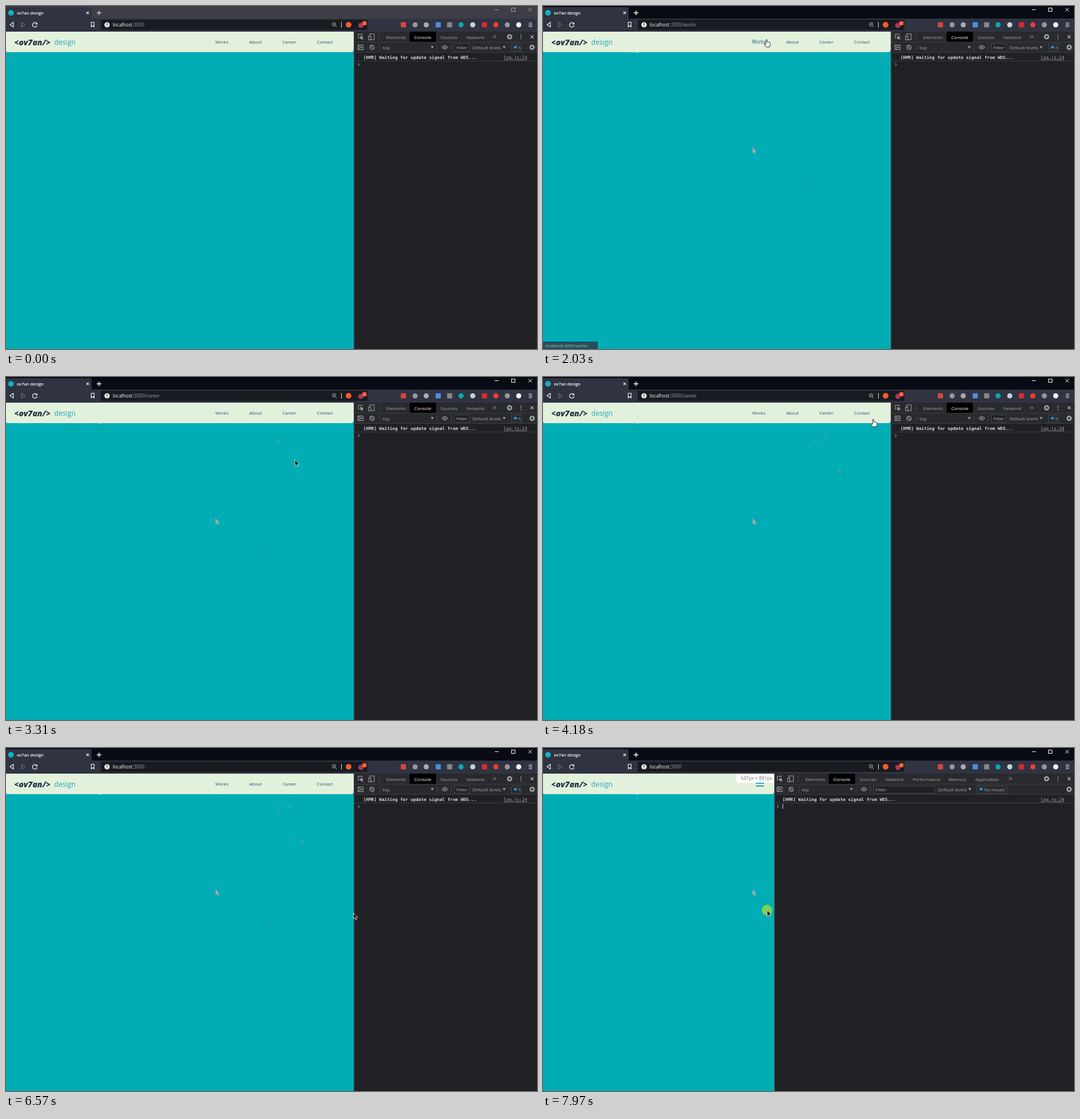
An HTML page for the animation above (8000 ms loop, 930 by 602 pixels).

```html
<!DOCTYPE html>
<html lang="en">
<head>
<meta charset="utf-8">
<title>Browser window</title>
<style>
  html, body { margin: 0; width: 100%; height: 100%; overflow: hidden; background: #202124; }
  svg { display: block; width: 930px; height: 602px; }
  text { font: 8px "Open Sans", "Noto Sans", sans-serif; white-space: pre; }
  .mono { font: bold 7.65px "DejaVu Sans Mono", monospace; }
</style>
</head>
<body>
<svg id="stage" viewBox="0 0 930 602" xmlns="http://www.w3.org/2000/svg"></svg>
<script>
const LOOP = 8000;
const WIDE = 609;
const TEAL = '#00adb5';

const rect = (x, y, w, h, fill, more = '') =>
  `<rect x="${x}" y="${y}" width="${w}" height="${h}" fill="${fill}" ${more}/>`;
const dot = (x, y, r, fill, more = '') =>
  `<circle cx="${x}" cy="${y}" r="${r}" fill="${fill}" ${more}/>`;
const line = (d, stroke, width = 1, more = '') =>
  `<path d="${d}" fill="none" stroke="${stroke}" stroke-width="${width}" ${more}/>`;
const shape = (d, fill, more = '') => `<path d="${d}" fill="${fill}" ${more}/>`;
const text = (x, y, label, fill, more = '') =>
  `<text x="${x}" y="${y}" fill="${fill}" ${more}>${label}</text>`;
const cross = (x, y, r, stroke, w = 1) =>
  line(`M${x - r} ${y - r}l${2 * r} ${2 * r}m0 ${-2 * r}l${-2 * r} ${2 * r}`, stroke, w);

const ARROW = 'M0 0V10.5L2.4 8.3 4 12 5.7 11.3 4.1 7.8H7.4Z';
const HAND = 'M-1 .8Q0-.4 1 .8V5L2 4.4 3.2 5.2 4.4 4.8 5.4 5.7Q6.6 5.6 6.6 6.8V9.5L5.4 13.5H-.8L-4 8.5Q-4 7.2-2.8 7.4L-1 9Z';

function gear(x, y) {
  return dot(x, y, 2.9, 'none', 'stroke="#a4a7ab" stroke-width="2"') +
    dot(x, y, 4.3, 'none', 'stroke="#a4a7ab" stroke-width="1.3" stroke-dasharray="1.7 1.68"');
}

function titleBar(focused) {
  const ink = focused ? '#fff' : '#a5a6ac';
  return rect(0, 0, 930, 23, focused ? '#090b14' : '#3d3e46') +
    shape('M0 23V2H147Q150 2 150 5V23Z', '#303341') +
    dot(8.7, 12, 5, '#12afc0') +
    text(19, 14.8, 'ov7an design', '#fff', 'style="font-size:7.4px;font-weight:600"') +
    cross(143, 12, 2.2, '#fff', 1.1) +
    line('M159 12h8M163 8v8', focused ? '#fff' : '#d0d0d4', 1.3) +
    line('M856 6.5h7', ink) +
    rect(885.5, 3.5, 6, 6, 'none', `stroke="${ink}"`) +
    cross(918, 6.5, 3, ink);
}

function toolbar() {
  const chips = [
    [696, '#d8483c'], [757, '#4d8ee0'], [777, '#85878e'], [838, '#d92b31']
  ].map(([x, c]) => rect(x - 4.5, 28.5, 9, 9, c, 'rx="1"')).join('');
  const rounds = [
    [716.5, '#92999c'], [736, '#aaaaae'], [797, '#0aa9ad'], [817.5, '#c5d3d6'], [858, '#f23c35'], [878, '#96979e'], [898, '#f2f2f4']
  ].map(([x, c]) => dot(x, 33, 4.5, c)).join('');
  return rect(0, 22, 930, 23, '#303341') +
    rect(166, 24, 467, 18, '#191b21', 'rx="2"') +
    line('M12.8 28.5V37L7 32.8Z', '#fff', 1.1) +
    line('M27.5 28.5V37L33.3 32.8Z', '#7c7e87') +
    line('M53.6 30.6A4 4 0 1 0 54.4 34', '#fff', 1.2) + shape('M54.8 28.5V32.2H51Z', '#fff') +
    line('M149.3 28.5h5v8l-2.5-2-2.5 2Z', '#fff', 1.1) +
    dot(177, 33, 4.6, '#fff') + line('M177 30v3.7m0 1v1.3', '#191b21', 1.3) +
    dot(574.5, 32.2, 3, 'none', 'stroke="#b6b8be"') + line('M573 32.2h3M576.8 34.6l2.4 2.4', '#b6b8be') +
    line('M587.5 28v10', '#ddd') +
    dot(600, 33, 5, '#f45a2d') +
    dot(621.5, 34, 4.6, '#a33a62') +
    rect(624, 26.5, 7.5, 7.5, '#fb542b', 'rx="2"') +
    text(627.8, 32.6, '1', '#fff', 'text-anchor="middle" style="font-size:6px"') +
    chips + rounds +
    line('M915.5 30h6M915.5 33h6M915.5 36h6', '#fff', 1.2);
}

const TABS = [
  ['Elements', 57], ['Console', 106], ['Sources', 152], ['Network', 197],
  ['Performance', 245], ['Memory', 307.5], ['Application', 354.5], ['', 414.5]
];

function devtools(left, loaded, caret) {
  const grey = '#a4a7ab', rule = '#45474a';
  const at = dx => left + dx;
  const down = (x, y) => shape(`M${x - 2.5} ${y - 2}h5l-2.5 4Z`, grey);
  let out = rect(left, 45, 930, 557, '#202124') + rect(left, 45, 930, 37, '#292a2d') +
    rect(at(98), 45, 46, 18.5, '#000') +
    line(`M${left} 63.5H930M${left} 81.5H930M${left} 96.5H930`, '#3b3d40') +
    line(`M${at(44.5)} 49v11M${at(45.5)} 68v10M${at(146)} 68v10M${at(171)} 68v10`, rule);

  out += line(`M${at(15)} 52v-2.5h-7v7h2.5`, grey) + shape(`M${at(11)} 52.5l6.5 2.6-2.7 1 2 2.2-1 1-2-2.3-1.2 2.4Z`, grey) +
    rect(at(28), 49, 8, 10, 'none', `stroke="${grey}"`) + rect(at(26), 53, 4, 6.5, '#292a2d', `stroke="${grey}"`);

  let next = 0;
  for (let i = 0; i < 7 && left + TABS[i + 1][1] < 865; i++) {
    const [label, dx] = TABS[i];
    out += text(at(dx), 57.5, label, label === 'Console' ? '#fff' : grey);
    next = TABS[i + 1][1];
  }
  const more = at(next - 1);
  out += line(`M${more} 51.5l2.4 2.4-2.4 2.4m3.2-4.8l2.4 2.4-2.4 2.4`, grey) +
    gear(882, 54) + [50.5, 54, 57.5].map(y => dot(902, y, 0.9, grey)).join('') + cross(921.5, 54, 2.7, '#c5c7ca', 1.1);

  const end = Math.min(at(283.5), Math.max(at(202), 774));
  const issuesEnd = Math.min(end + 127, 903);
  out += rect(at(7.5), 68.5, 9, 8, 'none', `stroke="${grey}"`) + line(`M${at(10)} 68.5v8`, grey) + shape(`M${at(12)} 70.2v4.6l3-2.3Z`, grey) +
    dot(at(32), 72.7, 3.8, 'none', `stroke="${grey}" stroke-width="1.2"`) + line(`M${at(29.3)} 70l5.4 5.4`, grey, 1.2) +
    text(at(50.5), 75.8, 'top', grey) + down(at(137.5), 72.5) +
    line(`M${at(154.5)} 72.5q5-6.4 10 0q-5 6.4-10 0Z`, grey, 1.1) + dot(at(159.5), 72.5, 1.5, grey) +
    rect(at(176.5), 66.5, end - at(176.5), 13, '#202124', `stroke="${rule}"`) +
    text(at(180), 76, 'Filter', '#b5b8bc') +
    text(end + 6, 75.8, 'Default levels', grey) + down(end + 61.5, 72.5) +
    `<svg x="${end + 74}" y="66" width="${issuesEnd - end - 74}" height="14">` +
    rect(4.5, 4, 5.5, 4.5, '#2188df') + text(12.5, 9.8, 'No Issues', grey) + '</svg>' +
    rect(end + 74.5, 66.5, issuesEnd - end - 75, 13, 'none', `stroke="${rule}"`) +
    rect(906, 64, 24, 17, '#292a2d') + gear(921.5, 72.5);

  if (loaded) {
    out += text(at(17), 93, '[HMR] Waiting for update signal from WDS...', '#d6d8da', 'class="mono"') +
      text(913, 93, 'log.js:24', '#a4a7ab', 'class="mono" style="font-weight:400" text-anchor="end" text-decoration="underline"');
  }
  out += line(`M${at(7.5)} 100.2l2.5 2.5-2.5 2.5`, '#3f8ee8', 1.2);
  if (caret) out += line(`M${at(17.5)} 98v9`, '#d8d8d8');
  return out;
}

const NAV = [['Works', 378], ['About', 437], ['Career', 496.3], ['Contact', 558.5]];

// Faint pointer marks that stay behind: x, y, colour, opacity, start
const MARKS = [
  [367, 248, '#aaa9a5', 1, 800], [457, 304, '#2097ae', .55, 620], [442, 98, '#0e9ba8', .4, 2400],
  [475, 107, '#42a0b0', .6, 3200], [493, 96, '#42a0b0', .6, 3550], [517, 159, '#42a0b0', .7, 3350],
  [561, 76, '#2a9dad', .5, 4300]
];

function page(t, width) {
  let out = rect(0, 45, width, 557, TEAL);
  for (const [x, y, color, opacity, start] of MARKS)
    if (t >= start) out += shape(ARROW, color, `transform="translate(${x} ${y})" opacity="${opacity}"`);
  if (t >= 1000) out += rect(164, 80, 2.5, 3, '#a5b5b5') + rect(146.5, 81, 1.5, 3, '#5fa9ac');
  out += shape(`M0 45H${width}V76Q${width} 81 ${width - 5} 81H3Q0 81 0 78Z`, '#e2f1dc') +
    text(14.5, 68.5, '&lt;ov7an/&gt;', '#263645', 'style="font-size:14px;font-weight:800;font-style:italic"') +
    text(84.5, 68.3, 'design', '#20a4bd', 'style="font-size:12.2px"');
  if (width > 440) {
    for (const [label, x] of NAV) {
      const hovered = label === 'Works' && t > 1380 && t < 2240;
      out += text(x + width - WIDE, 66.4, label, '#245078',
        `text-anchor="middle" style="font-size:${hovered ? 8.2 : 7.8}px"`);
    }
  } else {
    out += line([57, 61.8, 66.8].map(y => `M${width - 32} ${y}h14`).join(''), '#149fb8', 2);
  }
  return out;
}

function address(t) {
  const path = t < 1720 ? '' : t < 2900 ? '/works' : t < 5490 ? '/career' : '';
  return text(187, 36, `localhost<tspan fill="#9a9ca4">:3000${path}</tspan>`, '#fff', 'style="font-size:8.2px"');
}

const HINTS = [[1640, 2140, 'localhost:3000/works'], [4280, 4600, 'localhost:3000/contact'], [5140, 5600, 'localhost:3000']];

function statusHint(t) {
  const hint = HINTS.find(([from, to]) => t >= from && t < to);
  if (!hint) return '';
  const [from, to, label] = hint;
  const opacity = Math.min(1, (t - from + 40) / 140, (to - t) / 140);
  return `<g opacity="${opacity}">` + rect(0, 589, label.length * 4.3 + 10, 13, '#303341') +
    text(4, 598.5, label, '#c8cad0', 'style="font-size:7.5px"') + '</g>';
}

// Pointer path: time, x, y
const PATH = [
  [120, 817, 563], [390, 458, 303], [590, 458, 303], [800, 367, 248], [1020, 147, 73],
  [1120, 163, 72], [1350, 384, 60], [1430, 391.5, 58.5], [2240, 391.5, 58.5], [2440, 442, 98],
  [2700, 476.5, 83.5], [2880, 493, 61], [3100, 493, 62], [3200, 475, 107], [3350, 517, 159],
  [3550, 493, 96], [3850, 545, 66], [4180, 578.5, 74], [4300, 561, 76], [4660, 390, 98],
  [4940, 118, 64], [5140, 118, 64], [5280, 116, 58], [5490, 116, 58], [6020, 596, 291],
  [6220, 601, 290], [6290, 604, 290], [6560, 604, 290], [6570, 608.5, 289.5], [7170, 608.5, 289.5], [7230, 609, 287]
];
const CLICKS = [1650, 2870, 5420];

function pointer(t) {
  const i = PATH.findIndex(p => p[0] > t);
  if (i < 0) return PATH[PATH.length - 1].slice(1);
  const [t0, x0, y0] = PATH[i - 1], [t1, x1, y1] = PATH[i];
  const k = (t - t0) / (t1 - t0);
  return [x0 + (x1 - x0) * k, y0 + (y1 - y0) * k];
}

// Resize steps: page width, panel origin, pointer x
const DRAG = [
  [609, 609, 609], [609, 608, 605], [606, 600, 590], [590, 570, 540],
  [538, 519, 449], [450, 440, 425], [424, 415, 405], [405, 402.5, 392.5]
];

function cursor(t, x, y, dragging) {
  const pressed = dragging || CLICKS.some(c => t >= c && t < c + 120);
  const overLink = y < 77 && ((x > 363 && x < 394) || (x > 422 && x < 451) || (x > 481 && x < 511) || (x > 541 && x < 580) || (x > 12 && x < 124));
  const hand = overLink && !dragging;
  return (pressed ? dot(x, y, 9.5, '#79d05b') : '') +
    shape(hand ? HAND : ARROW, hand ? '#fff' : '#000',
      `stroke="${hand ? '#000' : '#fff'}" stroke-width=".8" stroke-linejoin="round" transform="translate(${x} ${y})"`);
}

const LAYERS = ['panel', 'page', 'bar', 'tools', 'address', 'hint', 'cursor'];
stage.innerHTML = '<clipPath id="view"><rect id="viewRect" y="45" height="557"/></clipPath>' +
  LAYERS.map(n => `<g id="${n}Layer" ${n === 'page' ? 'clip-path="url(#view)"' : ''}></g>`).join('');
const layers = Object.fromEntries(LAYERS.map(n => [n, document.getElementById(n + 'Layer')]));
const shown = {};
function put(name, markup) {
  if (shown[name] !== markup) layers[name].innerHTML = shown[name] = markup;
}

function render(t) {
  const dragging = t >= 7495;
  const step = Math.min(7, Math.max(0, Math.floor((t - 7495) / 66.7)));
  const [width, origin, dragX] = DRAG[step];
  const [x, y] = dragging ? [dragX, 289 - step * .2 - (step > 4 ? 3 : 0)] : t >= 120 ? pointer(t) : [0, 0];
  const reloading = [1780, 2960, 5550].some(s => t >= s && t < s + 200);

  document.getElementById('viewRect').setAttribute('width', width);
  put('panel', devtools(origin, !reloading, dragging) + rect(width, 45, 1.5, 557, '#3a3d41'));
  let body = page(t, width);
  if (dragging && step > 0) {
    const px = Math.round(647 + (width - 405) * 1.579);
    body += rect(width - 66, 45, 66, 16, '#fff') +
      text(width - 3.5, 56.3, `${px}px × 881px`, '#77797c', 'text-anchor="end" style="font-size:8.2px"');
  }
  put('page', body);
  put('bar', titleBar(t >= 1650));
  put('tools', toolbar());
  put('address', address(t));
  put('hint', statusHint(t));
  put('cursor', t >= 120 ? cursor(t, x, y, dragging) : '');
}

const start = performance.now();
function tick() {
  render((performance.now() - start) % LOOP);
  requestAnimationFrame(tick);
}
tick();
</script>
</body>
</html>
```
